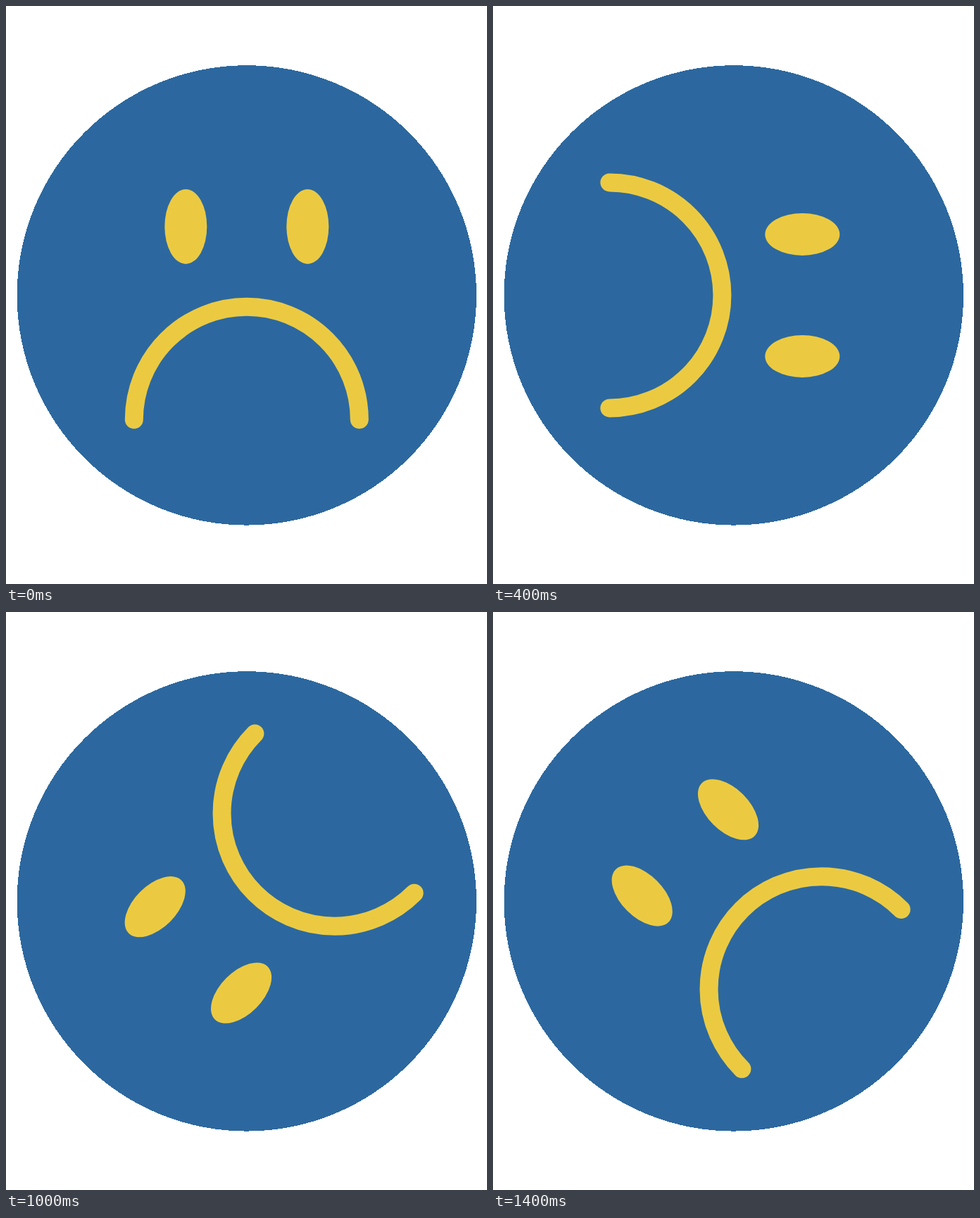
Write an HTML page that moves like this. It is 683 by 820 pixels and loops after 1.6 s.

```html
<!DOCTYPE html>
<html lang="en">
<head>
<meta charset="utf-8">
<title>Turning face</title>
<style>
  html, body { margin: 0; width: 100%; height: 100%; overflow: hidden; background: #fff; }
  svg { display: block; width: 100%; height: 100%; }
</style>
</head>
<body>
<svg viewBox="0 0 683 820">
  <g transform="translate(341.8 410.4)">
    <circle r="326.2" fill="#2c689f" shape-rendering="crispEdges"/>
    <g id="face" fill="#ebca42">
      <ellipse cx="-86.5" cy="-97.5" rx="30" ry="53"/>
      <ellipse cx="86.5" cy="-97.5" rx="30" ry="53"/>
      <path d="M-160 176.4A160 160 0 0 1 160 176.4" fill="none" stroke="#ebca42" stroke-width="26" stroke-linecap="round"/>
    </g>
  </g>
</svg>
<script>
  const face = document.getElementById('face');
  const STEP = 200, STEPS = 8;
  const start = performance.now();

  // The face turns clockwise in hard eighth-turn steps.
  function draw(now) {
    const step = Math.floor(Math.max(0, now - start) / STEP) % STEPS;
    face.setAttribute('transform', `rotate(${step * 360 / STEPS})`);
    requestAnimationFrame(draw);
  }
  draw(start);
</script>
</body>
</html>
```
